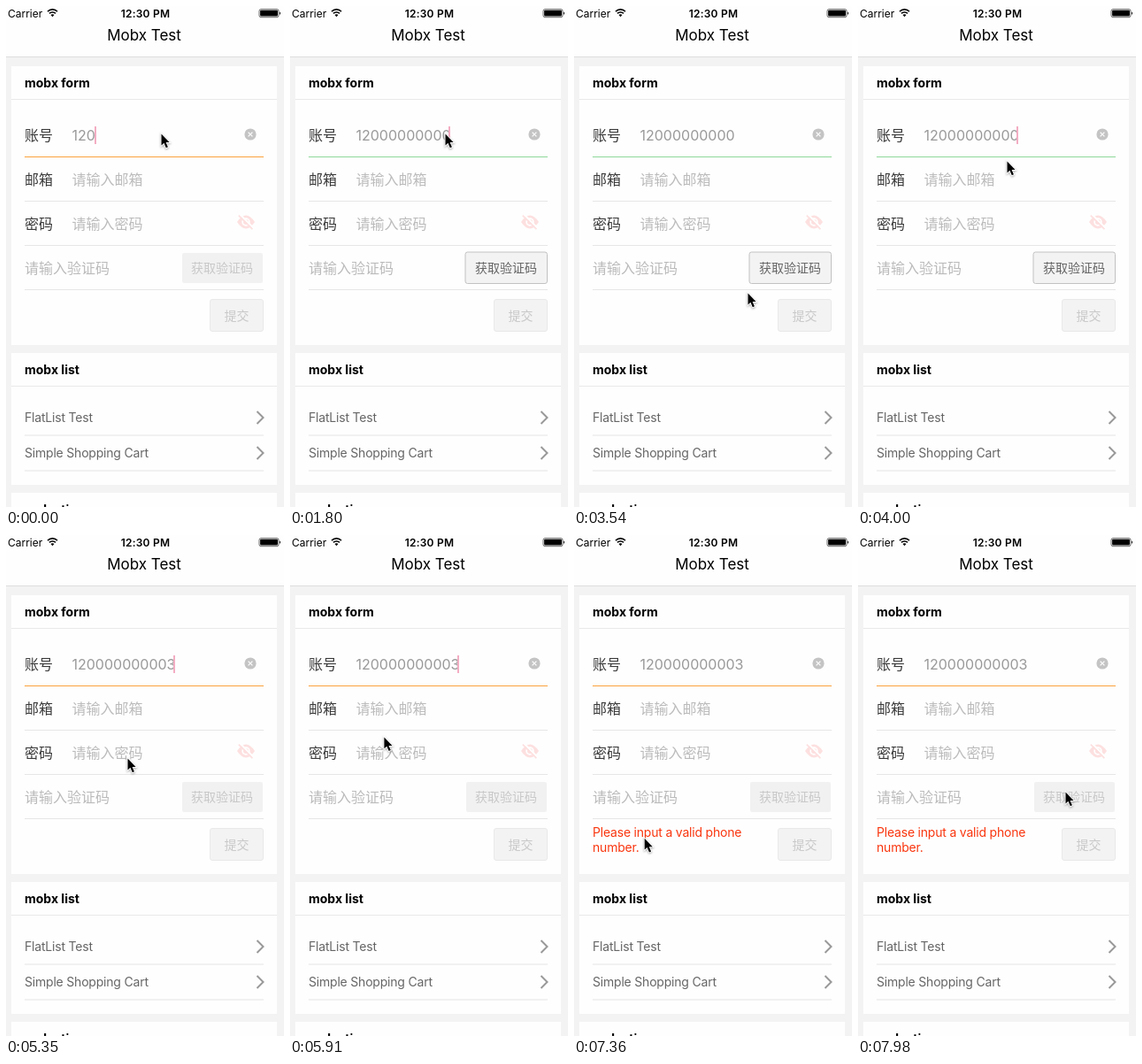
An HTML page for the animation above (8 s loop, 314 by 566 pixels).

```html
<!DOCTYPE html>
<html lang="zh-CN">
<head>
<meta charset="utf-8">
<title>Mobx Test</title>
<style>
  html, body { margin: 0; width: 100%; height: 100%; overflow: hidden; background: #f3f3f3; }
  svg { display: block; font-family: Inter, "Noto Sans CJK SC", "Noto Sans CJK", sans-serif; }
  .status { font-size: 12px; }
  .title { font-size: 17px; }
  .head { font-size: 14px; font-weight: 700; }
  .item, .error { font-size: 14px; letter-spacing: -.2px; fill: #666; }
  .error { fill: #f9360f; }
  .label, .hint, .value { font-size: 16px; }
  .label { fill: #3a3a3a; }
  .hint { fill: #bbb; }
  .value { fill: #999; }
  .button { font-size: 14px; fill: #c8c8c8; text-anchor: middle; }
  .mid { text-anchor: middle; }
</style>
</head>
<body>
<svg width="314" height="566" viewBox="0 0 314 566">
  <rect width="314" height="57" fill="#fefefe"/>
  <rect y="57" width="314" height="1" fill="#dedede"/>
  <text class="status" x="2" y="12.5">Carrier</text>
  <g fill="none" stroke="#000" stroke-width="1.6">
    <path d="M47 6.2a7.6 7.6 0 0 1 11 0M49 8.4a4.9 4.9 0 0 1 7 0"/>
    <path d="M52.5 12.2l-2-2.1a2.9 2.9 0 0 1 4 0z" fill="#000" stroke="none"/>
  </g>
  <text class="status mid" x="157.5" y="12.5" font-weight="600" letter-spacing=".2">12:30 PM</text>
  <rect x="286" y="3.7" width="22" height="9" rx="2" fill="none" stroke="#000" stroke-width=".6"/>
  <rect x="287.1" y="4.8" width="19.8" height="6.8" rx="1"/>
  <path d="M309 6.5q2 1.7 0 3.5z"/>
  <text class="title mid" x="156" y="39.4">Mobx Test</text>

  <g id="content"></g>
  <rect id="active" x="21" y="170" width="270" height="1"/>

  <text id="phone" class="value" x="74.5" y="151.8"></text>
  <circle cx="276" cy="145" r="6.6" fill="#c4c4c4"/>
  <path d="M273.6 142.6l4.8 4.8m0-4.8l-4.8 4.8" stroke="#fff" stroke-width="1.2"/>

  <path d="M261 244q10-15 20 0q-10 15-20 0z" fill="#fde0e0"/>
  <circle cx="271" cy="244" r="3.9" fill="#fde0e0" stroke="#fff" stroke-width="1.7"/>
  <path d="M264 235.2l16 16" stroke="#fff" stroke-width="2"/>
  <path d="M262.8 236.6l15.6 15.6" stroke="#fde0e0" stroke-width="1.8"/>

  <text class="hint" x="21" y="301.6">请输入验证码</text>
  <rect x="199" y="279" width="91" height="34" rx="2" fill="#f1f1f1"/>
  <rect id="codeBox" x="198" y="278" width="92.5" height="35.5" rx="2.5" fill="#f3f3f3" stroke="#c2c2c2"/>
  <text id="code" class="button" x="244" y="301">获取验证码</text>
  <rect x="230.5" y="331.5" width="60" height="36" rx="2.5" fill="#f3f3f3" stroke="#e9e9e9"/>
  <text class="button" x="260.5" y="354.5">提交</text>
  <g id="error" class="error">
    <text x="21" y="341">Please input a valid phone</text>
    <text x="21" y="358">number.</text>
  </g>

  <rect id="caret" width="2" height="20" fill="#f3adc3"/>
  <path id="mouse" d="M.5 .5V13.4L3.4 10.8L5.8 16.2L7.9 15.2L5.6 10H9.6Z" stroke="#fff" stroke-width="1.8"
        paint-order="stroke" style="filter:drop-shadow(0 1px 1px #0005)"/>
</svg>
<script>
const $ = id => document.getElementById(id);
const LOOP = 8000;
const NUMBER = "120000000003";
const VALID = 1800, INVALID = 4770, BLUR = 6380;

// pointer strokes: start time, end time, tip position reached
const moves = [
  [2400, 2850, 241, 300], [2850, 3150, 196, 324], [3540, 4000, 168, 175],
  [5230, 5350, 137, 252], [5350, 5480, 120, 297], [5480, 6090, 100, 199],
  [6700, 6800, 105, 215], [6800, 7130, 62, 348], [7310, 7810, 234, 290]
];

const line = y => `<rect x="21" y="${y}" width="270" height="1" fill="#e6e6e6"/>`;

const card = (name, y, h) => `<rect x="6" y="${y}" width="300" height="${h}" fill="#fefefe"/>
  <rect x="6" y="${y + 37}" width="300" height="1" fill="#e9e9e9"/>
  <text class="head" x="21" y="${y + 23.6}">${name}</text>`;

const field = (name, i) => `<text class="label" x="21" y="${151.7 + 50 * i}">${name}</text>
  <text class="hint" x="74.5" y="${151.6 + 50 * i}">${i ? "请输入" + name : ""}</text>
  ${line(170 + 50 * i)}`;

const item = (name, i) => `<text class="item" x="21" y="${470 + 40 * i}">${name}</text>
  <path d="M283.5 ${458 + 40 * i}l7 7l-7 7" fill="none" stroke="#999" stroke-width="2"/>
  ${line(484.5 + 40 * i)}`;

$("content").innerHTML = [
  card("mobx form", 68, 315), card("mobx list", 392, 149), card("mobx timer", 550, 30),
  ...["账号", "邮箱", "密码"].map(field), line(320),
  ...["FlatList Test", "Simple Shopping Cart"].map(item)
].join("");

const clamp = (v, lo, hi) => Math.min(hi, Math.max(lo, v));

function set(id, attrs) {
  for (const name in attrs) $(id).setAttribute(name, attrs[name]);
}

// Steady typing up to ten digits, then one more at each change of validity
function digitsAt(t) {
  if (t >= INVALID) return 12;
  if (t >= VALID) return 11;
  return clamp(Math.floor((t - 300) / 182) + 4, 3, 10);
}

function pointerAt(t) {
  let x = 175, y = 144;
  for (const [from, to, toX, toY] of moves) {
    const k = clamp((t - from) / (to - from), 0, 1);
    x += (toX - x) * k;
    y += (toY - y) * k;
  }
  return [x, y];
}

// The blink restarts with every edit or change of focus
function caretAlpha(t) {
  const reset = [BLUR, INVALID, VALID].find(s => t >= s);
  if (!reset || t < reset + 590) return 1;
  const phase = (t - reset - 590) % 955;
  return phase < 40 ? .5 : phase < 470 ? 0 : 1;
}

function draw(t) {
  const count = digitsAt(t);
  const valid = count === 11;
  const blurred = t >= BLUR;

  $("phone").textContent = NUMBER.slice(0, count);
  set("active", { fill: valid ? "#8fd89a" : "#fba23c" });
  set("codeBox", { visibility: valid ? "visible" : "hidden" });
  $("code").style.fill = valid ? "#666" : "#c8c8c8";
  set("error", { visibility: blurred ? "visible" : "hidden" });
  set("caret", {
    x: blurred ? 74 : Math.round(70.6 + 9.85 * count),
    y: blurred ? 185.5 : 136,
    opacity: caretAlpha(t)
  });
  set("mouse", { transform: `translate(${pointerAt(t)})` });
}

let start;
function tick(now) {
  start ??= now;
  draw((now - start) % LOOP);
  requestAnimationFrame(tick);
}
draw(0);
requestAnimationFrame(tick);
</script>
</body>
</html>
```
